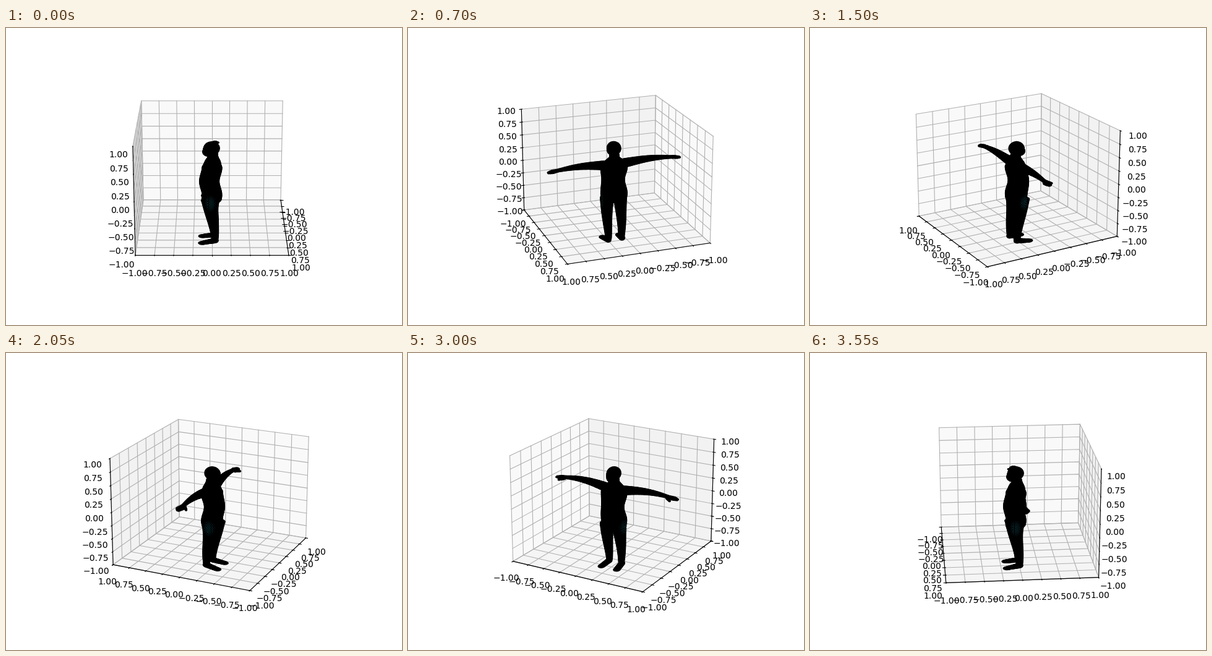
An HTML page with a canvas for the animation above (3600 ms loop, 640x480 px).

```html
<!DOCTYPE html>
<html lang="en">
<head>
<meta charset="utf-8">
<title>Rotating figure plot</title>
<style>
  html, body { margin: 0; width: 640px; height: 480px; overflow: hidden; background: #fff; }
  canvas { display: block; }
</style>
</head>
<body>
<canvas id="plot" width="640" height="480"></canvas>
<script>
const ctx = document.getElementById('plot').getContext('2d');
const { sin, cos, PI, round, floor, ceil, hypot } = Math;

const STEP_MS = 50, STEPS = 72;
const CENTER = [332.995, 237.405];
const DIST = 1997.84;                  // camera distance in pixels
const SCALE = [118.92, 118.92, 89.19]; // pixels per data unit
const ELEV = PI / 9, SE = sin(ELEV), CE = cos(ELEV);
const TICKS = Array.from({ length: 9 }, (_, i) => i / 4 - 1);
const TICK_OUT = 0.032, TICK_IN = 0.016, LABEL_PAD = 0.166;
const PANES = ['#f9f9f9', '#f2f2f2', '#f5f5f5'];
const BEARING = { '0': 0.92, '1': 1.53, '\u2212': 1.47 }; // ink offset of a leading glyph

let sinA = 0, cosA = 1;

function project([x, y, z]) {
  const near = cosA * x + sinA * y;
  const right = cosA * y - sinA * x;
  const up = CE * z - SE * near;
  const depth = 1 - (CE * near + SE * z) / DIST;
  return [CENTER[0] + right / depth, CENTER[1] - up / depth];
}

const projectData = p => project(p.map((v, i) => v * SCALE[i]));

function trace(points) {
  ctx.beginPath();
  points.forEach(([x, y]) => ctx.lineTo(x, y));
}

// Purely horizontal or vertical paths snap to pixel centres.
function snap(points) {
  const straight = points.slice(1).every(([x, y], i) =>
    Math.abs(x - points[i][0]) < 1e-4 || Math.abs(y - points[i][1]) < 1e-4);
  return straight ? points.map(p => p.map(v => floor(v + 0.5) + 0.5)) : points;
}

function strokeData(points, color) {
  trace(snap(points.map(projectData)));
  ctx.strokeStyle = color;
  ctx.stroke();
}

// Copy of a point with some coordinates replaced.
const at = (point, changes) => Object.assign(point.slice(), changes);

function drawPane(far, axis) {
  const j = (axis + 1) % 3, k = (axis + 2) % 3;
  const corners = [[-1, -1], [1, -1], [1, 1], [-1, 1]];
  trace(corners.map(([u, v]) => projectData(at(far, { [j]: u, [k]: v }))));
  ctx.fillStyle = PANES[axis];
  ctx.fill();
}

function drawGrid(far, axis) {
  const j = (axis + 1) % 3, k = (axis + 2) % 3;
  for (const t of TICKS) {
    const corner = at(far, { [axis]: t });
    strokeData([at(corner, { [j]: -far[j] }), corner, at(corner, { [k]: -far[k] })], '#b0b0b0');
  }
}

// The leading glyph and the rest round to whole pixels separately.
function drawLabel(value, [x, y]) {
  const text = (value < 0 ? '\u2212' : '') + Math.abs(value).toFixed(2);
  const first = text[0], bearing = BEARING[first];
  const left = round(x - ctx.measureText(text).width / 2 + bearing);
  const base = round(y + 11);
  ctx.fillText(first, left - floor(bearing), base);
  ctx.fillText(text.slice(1), left - ceil(bearing) + ctx.measureText(first).width, base);
}

function drawAxis(far, axis) {
  const side = axis === 0 ? 1 : 0;
  const edge = at(far, { [side]: -far[side] });
  const out = edge[side];
  strokeData([at(edge, { [axis]: -1 }), at(edge, { [axis]: 1 })], '#000');
  for (const t of TICKS) {
    const p = at(edge, { [axis]: t });
    strokeData([1 - TICK_IN, 1 + TICK_OUT].map(f => at(p, { [side]: out * f })), '#000');
    drawLabel(t, projectData(p.map((v, i) => i === axis ? v : v + Math.sign(v) * LABEL_PAD)));
  }
}

// Outline of an ellipsoid (centre and radii), from its support points.
function ellipsoid([x, y, z, rx, ry, rz]) {
  const points = [];
  for (let i = 0; i < 28; i++) {
    const c = cos(i * PI / 14), s = sin(i * PI / 14);
    const nx = -sinA * c - SE * cosA * s;
    const ny = cosA * c - SE * sinA * s;
    const nz = CE * s;
    const len = hypot(rx * nx, ry * ny, rz * nz);
    points.push(project([x + rx * rx * nx / len, y + ry * ry * ny / len, z + rz * rz * nz / len]));
  }
  trace(points);
  ctx.fill();
}

// A limb is a run of ellipsoids given by a rule over 0..1.
function sweep(rule, count = 40) {
  for (let i = 0; i <= count; i++) ellipsoid(rule(i / count));
}

const taper = (a, b) => sweep(t => a.map((v, i) => v + (b[i] - v) * t), 12);

function torso(t) {
  const z = 13 - 55 * t;
  return [0, 2.2 * cos(2 * PI * (z - 13) / 48) - 2.2, z,
    21.2 - 1.6 * cos(2 * PI * (z + 9.5) / 45), 16.6, 4];
}

const leg = side => t => [
  side * (11.3 + sin(PI * t)), 1 - 3.7 * cos(PI * t), -40 - 67 * t,
  11 - 5.7 * t, 15.5 - 9.5 * t ** 0.7, 4
];

const arm = side => t => {
  const r = 2.1 + 5.7 * (1 - t);
  const hand = 5 * Math.exp(-(((t - 0.93) / 0.07) ** 2));
  return [side * (18 + 94 * t), 5 - 3.5 * (1 - t) ** 3, 19 + 3.8 * sin(PI * t), r, r + hand, r];
};

// Faint mesh faces on the sides of the hips.
function speckles(side) {
  ctx.fillStyle = '#17606a';
  for (let row = 0; row < 13; row++) {
    for (let col = 0; col < 8; col++) {
      const y = -12 + 2.2 * col + (row % 2) * 1.1;
      const z = -28 - 2.1 * row;
      const nx = side * Math.sqrt(1 - (y / 17) ** 2);
      const facing = nx * cosA + y / 17 * sinA;
      if (facing < 0.35) continue;
      const rim = hypot((y + 3) / 10, (z + 41) / 14);
      ctx.globalAlpha = Math.max(0, 1 - rim * rim) * facing;
      const [px, py] = project([nx * 22, y, z]);
      ctx.fillRect(round(px), round(py), 1, 1);
    }
  }
  ctx.globalAlpha = 1;
}

function drawBody() {
  ctx.fillStyle = '#000';
  const chest = [0, 0, 13, 22, 16, 4], collar = [0, 1, 22, 19, 13, 4];
  const throat = [0, 1.5, 30, 8.3, 9, 3], nape = [0, 1, 36, 8, 8, 4];
  sweep(torso);
  taper(chest, collar);
  taper(collar, throat);
  taper(throat, nape);
  taper([0, -0.5, 45.5, 11.6, 13.3, 11.2], [0, -6, 39, 9.2, 9.7, 7.3]);
  for (const side of [-1, 1]) {
    sweep(leg(side));
    taper([side * 12, 5, -110, 5.3, 6, 4.5], [side * 14.5, -16.5, -113.3, 6, 6.5, 2.5]);
    sweep(arm(side));
    taper([side * 95, 2, 19.5, 2.5, 2.5, 2.2], [side * 103, -4, 18, 2, 2, 1.8]);
  }
  speckles(-1);
  speckles(1);
}

function render(step) {
  const azim = step * 2 * PI / STEPS;
  sinA = sin(azim);
  cosA = cos(azim);
  const far = [cosA >= 0 ? -1 : 1, sinA >= 0 ? -1 : 1, -1];
  const axes = [0, 1, 2];

  ctx.fillStyle = '#fff';
  ctx.fillRect(0, 0, 640, 480);
  ctx.lineWidth = 1.11;
  ctx.lineJoin = 'round';
  ctx.font = '13.889px "DejaVu Sans", sans-serif';

  ctx.lineCap = 'square';
  axes.forEach(i => drawPane(far, i));
  axes.forEach(i => drawGrid(far, i));
  ctx.lineCap = 'butt';
  ctx.fillStyle = '#000';
  axes.forEach(i => drawAxis(far, i));
  drawBody();
}

const start = performance.now();
let shown = -1;

function tick() {
  const step = floor((performance.now() - start) / STEP_MS) % STEPS;
  if (step !== shown) render(shown = step);
  requestAnimationFrame(tick);
}
tick();
</script>
</body>
</html>
```
